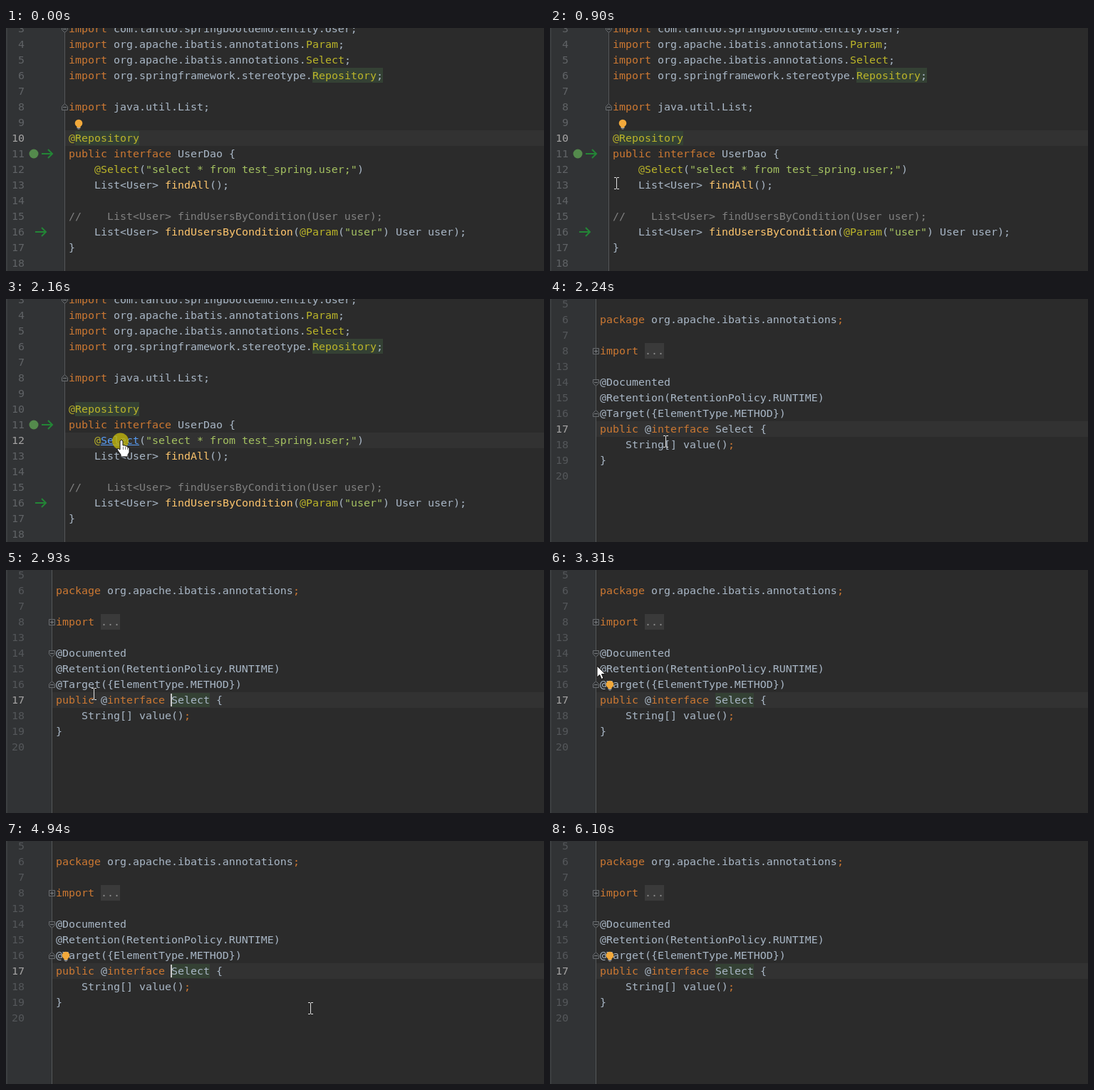
These frames come from a looping animation (755x342 px, 6170 ms). An HTML page with a canvas:

```html
<!DOCTYPE html>
<html lang="en">
<head>
<meta charset="utf-8">
<title>Jump to annotation</title>
<style>
  html, body { margin: 0; width: 100%; height: 100%; overflow: hidden; background: #2b2b2b; }
  canvas { display: block; }
</style>
</head>
<body>
<canvas id="stage" width="755" height="342"></canvas>
<script>
const W = 755, H = 342, LOOP = 6170, CELL = 9, ROW = 22;
const ctx = document.getElementById('stage').getContext('2d', { alpha: false });

const INK = {
  d: '#a9b7c6', k: '#cc7832', a: '#bbb529', s: '#a5c261',
  m: '#ffc66d', c: '#808080', l: '#589df6', f: '#8c8c8c'
};

// "~x" switches to the ink x.
const dao = {
  x: 88, top: 1, fold: 82, number: '#606366',
  numbers: Array.from({ length: 16 }, (_, i) => i + 3),
  lines: [
    '~kimport~d com.tanluo.springbootdemo.entity.User;',
    '~kimport~d org.apache.ibatis.annotations.~aParam~d;',
    '~kimport~d org.apache.ibatis.annotations.~aSelect~d;',
    '~kimport~d org.springframework.stereotype.~aRepository~d;',
    '',
    '~kimport~d java.util.List;',
    '',
    '~a@Repository',
    '~kpublic interface~d UserDao {',
    '~d    ~a@Select~d(~s"select * from test_spring.user;"~d)',
    '~d    List<User> ~mfindAll~d();',
    '',
    '~c//    List<User> findUsersByCondition(User user);',
    '~d    List<User> ~mfindUsersByCondition~d(~a@Param~d(~s"user"~d) User user);',
    '~d}',
    ''
  ]
};

const annotation = {
  x: 70, top: 7, fold: 64, number: '#54575a',
  numbers: [5, 6, 7, 8, 13, 14, 15, 16, 17, 18, 19, 20],
  lines: [
    '',
    '~kpackage~d org.apache.ibatis.annotations~k;',
    '',
    '~kimport ~f...',
    '',
    '~d@Documented',
    '~d@Retention(RetentionPolicy.RUNTIME)',
    '~d@Target({ElementType.METHOD})',
    '~kpublic ~d@~kinterface~d Select {',
    '~d    String[] value()~k;',
    '~d}',
    ''
  ]
};

// Pointer moves: start, end, number of steps, then points as [step, x, y].
const moves = [
  [520, 1130, 9, [[0, 247, 315], [2, 168, 272], [4, 101, 226], [5, 93, 218], [8, 140, 208]]],
  [1200, 1450, 4, [[0, 144, 207], [3, 157, 203]]],
  [1600, 1600, 1, [[0, 162, 200]]],
  [2700, 3310, 9, [[0, 160, 199], [4, 110, 165], [7, 69, 138], [8, 66, 135]]],
  [3460, 4000, 8, [[0, 69, 134], [3, 142, 132], [6, 228, 136], [7, 243, 140]]],
  [4080, 4540, 7, [[0, 253, 140], [1, 262, 142], [4, 276, 155], [6, 281, 163]]],
  [4860, 4935, 2, [[0, 345, 195], [1, 427, 235]]]
];

const between = (t, a, b) => t >= a && t < b;

function box(color, x, y, w, h) {
  ctx.fillStyle = color;
  ctx.fillRect(x, y, w, h);
}

function shape(points, fill, stroke, width = 1, closed = true) {
  ctx.beginPath();
  points.forEach(([x, y]) => ctx.lineTo(x, y));
  if (closed) ctx.closePath();
  if (fill) { ctx.fillStyle = fill; ctx.fill(); }
  if (stroke) { ctx.strokeStyle = stroke; ctx.lineWidth = width; ctx.stroke(); }
}

function disc(x, y, r, color) {
  ctx.fillStyle = color;
  ctx.beginPath();
  ctx.arc(x, y, r, 0, Math.PI * 2);
  ctx.fill();
}

function drawLine(markup, x, baseline) {
  for (const part of markup.split('~').slice(1)) {
    const text = part.slice(1);
    ctx.fillStyle = INK[part[0]];
    ctx.fillText(text, x, baseline);
    x += text.length * CELL;
  }
}

function drawBackground(page, current) {
  const rowTop = page.top + ROW * page.numbers.indexOf(current) - 11;
  box('#2b2b2b', 0, 0, W, H);
  box('#313335', 0, 0, page.fold, H);
  box('#323232', page.fold, rowTop, W - page.fold, ROW);
  box('#3c3f41', 0, 0, 2, H);
  box('#555759', page.fold, 0, 1, H);
}

function drawText(page, current) {
  page.numbers.forEach((n, i) => {
    const baseline = page.top + ROW * i + 5;
    ctx.fillStyle = n === current ? '#a4a3a3' : page.number;
    ctx.fillText(n, 26 - String(n).length * CELL, baseline);
    drawLine(page.lines[i], page.x, baseline);
  });
}

// dir 1 opens a block, -1 closes it, 0 is a collapsed block.
function foldMark(x, y, dir) {
  const cx = x + .5, cy = y + .5;
  const outline = dir
    ? [[-4, -4], [4, -4], [4, 1], [0, 5], [-4, 1]]
    : [[-4, -4], [4, -4], [4, 4], [-4, 4]];
  shape(outline.map(([px, py]) => [cx + px, cy + py * (dir || 1)]), '#313335', '#6a6d70');
  box('#7a7d80', x - 2, y, 5, 1);
  if (!dir) box('#7a7d80', x, y - 2, 1, 5);
}

function greenArrow(x, y) {
  shape([[x, y], [x + 15, y]], null, '#238636', 2, false);
  shape([[x + 9, y - 6], [x + 15, y], [x + 9, y + 6]], null, '#238636', 2, false);
}

function bulb(x, y) {
  disc(x, y - 1, 5.3, '#f2a93b');
  box('#f2a93b', x - 2.5, y + 2, 5, 3);
  box('#a9a9a9', x - 2.5, y + 5, 5, 1);
  box('#a9a9a9', x - 1.5, y + 6.5, 3, 1);
}

function beam(x, y) {
  box('#e0e0e0', x, y - 7, 1, 15);
  for (const end of [-8, 8]) {
    box('#e0e0e0', x - 3, y + end, 3, 1);
    box('#e0e0e0', x + 1, y + end, 3, 1);
  }
}

function arrowPointer(x, y) {
  const outline = [[0, 0], [0, 16], [3.7, 12.6], [6.2, 18.5], [9, 17.3], [6.5, 11.6], [11.5, 11.3]];
  shape(outline.map(([px, py]) => [x + px, y + py]), '#fff', '#111');
}

function hand(x, y) {
  const outline = [
    [-2, 0], [0, -2], [2, 0], [2, 6], [5, 6], [6, 7], [8, 7], [9, 9], [11, 9], [11, 16],
    [9, 19], [9, 22], [-1, 22], [-1, 19], [-6, 12], [-5, 10], [-2, 12]
  ];
  shape(outline.map(([px, py]) => [x + px, y + py]), '#fff', '#111');
  for (const px of [2, 5, 8]) box('#777', x + px, y + 8, 1, 4);
}

function pointerAt(t) {
  const move = moves.findLast(m => m[0] <= t);
  if (!move || t >= 5010) return null;
  const [start, end, steps, points] = move;
  const gap = (end - start) / (steps - 1) || 1;
  const step = Math.min(steps - 1, Math.floor((t - start + 2) / gap));
  const i = points.findIndex(p => p[0] >= step);
  const b = points[i], a = points[Math.max(0, i - 1)];
  const u = b === a ? 0 : (step - a[0]) / (b[0] - a[0]);
  return [1, 2].map(k => Math.round(a[k] + (b[k] - a[k]) * u));
}

function drawDao(t) {
  const current = t < 2160 ? 10 : 12;
  drawBackground(dao, current);
  box('#344134', 430, 56, 99, 21);
  box('#344134', 97, 145, 90, 20);
  foldMark(82, 1, 1);
  foldMark(82, 111, -1);
  disc(39, 177, 6.5, '#548a4c');
  greenArrow(50, 177);
  greenArrow(41, 287);
  drawText(dao, current);
  if (current === 10) bulb(102, 135);
  if (t >= 1600) {
    box(current === 12 ? '#323232' : '#2b2b2b', 133, 189, 54, 20);
    drawLine('~lSelect', 133, 204);
    box(INK.l, 133, 205, 54, 1);
  }
  if (t >= 2070) disc(160.5, 200, t < 2160 ? 9 : 11.5, 'rgba(190,178,12,.82)');
}

function drawAnnotation(t) {
  drawBackground(annotation, 17);
  box('#3a3a3a', 133, 62, 27, 22);
  if (t >= 2470) box('#344134', 232, 173, 54, 20);
  foldMark(64, 73, 0);
  foldMark(64, 117, 1);
  foldMark(64, 161, -1);
  drawText(annotation, 17);
  if (t >= 3000) bulb(84, 162);
  const blinks = [[2700, 3160], [3690, 4230], [4690, 5240], [5700, 6100]];
  if (blinks.some(([on, off]) => between(t, on, off))) box('#c8c8c8', 231, 174, 2, 18);
}

function render(t) {
  ctx.font = '14.95px "DejaVu Sans Mono", monospace';
  ctx.textBaseline = 'alphabetic';
  if (t < 2240) drawDao(t); else drawAnnotation(t);
  const pointer = pointerAt(t);
  if (!pointer) return;
  const draw = between(t, 1600, 2240) ? hand : pointer[0] < 70 ? arrowPointer : beam;
  draw(...pointer);
}

const begin = performance.now();
function tick() {
  render((performance.now() - begin) % LOOP);
  requestAnimationFrame(tick);
}
tick();
</script>
</body>
</html>
```
